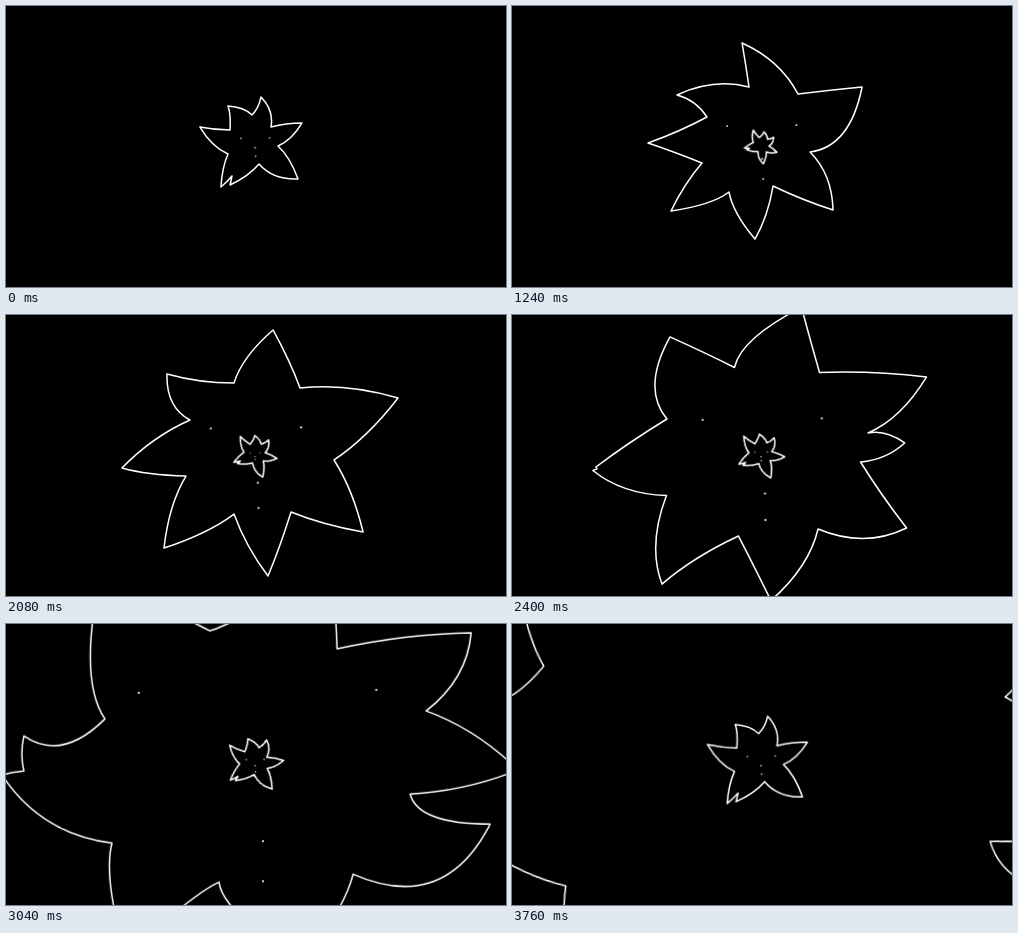
These frames come from a looping animation (500 by 281 pixels, 3800 ms). An HTML page without scripts:

```html
<!DOCTYPE html>
<html lang="en">
<head>
<meta charset="utf-8">
<title>Blooming flowers</title>
<style>
  html, body { margin: 0; width: 100%; height: 100%; overflow: hidden; background: #000; }
  svg { display: block; width: 100vw; height: 100vh; }
  path {
    fill: none; stroke: #fff; stroke-width: 1.5;
    stroke-linejoin: round; stroke-linecap: round;
    vector-effect: non-scaling-stroke;
    transform-origin: 249px 141px;
  }

  /* Both flowers share this pose: the bud ends in it, the bloom starts from it */
  .flower { d: path("M255 91Q268 104 265 121Q280 117 296 117Q286 134 272 140Q284 151 292 173Q267 174 253 158Q243 170 224 179Q225 175 226 170Q221 176 215 181Q216 162 222 148Q206 141 194 121Q209 124 224 124Q225 108 222 100Q238 101 246 109Q253 102 255 91Z"); }
  .bud { animation: bud 3800ms linear infinite; }
  .bloom { animation: bloom 3800ms linear infinite, leave 3800ms linear infinite; }

  .eyes { --spread: eyes; }
  .nose { --spread: nose; }
  .mouth { --spread: mouth; }
  g path { animation: var(--spread) 7600ms linear infinite, swell 7600ms linear infinite; }
  .older path { animation-delay: -3800ms; }

  @keyframes bud {
    0%, 7% { transform: rotate(70deg) scale(0); }
    18% { transform: rotate(60deg) scale(.16); }
    33% { transform: rotate(45deg) scale(.32); }
    55% { transform: rotate(33deg) scale(.42); }
    72% { transform: rotate(25deg) scale(.48); }
    80% { transform: rotate(18deg) scale(.55); }
    100% { transform: rotate(0deg) scale(1); }
  }

  /* Seven petals, then nine while leaving the stage */
  @keyframes bloom {
    17.89% { d: path("M243 63Q270 74 276 104Q297 104 317 101Q316 132 288 141Q294 158 314 172Q283 186 256 173Q234 192 235 213Q220 200 218 181Q203 184 183 184Q195 172 208 154Q190 133 166 132Q186 116 212 119Q208 94 187 92Q214 82 245 93Q247 79 243 63Z"); }
    32.63% { d: path("M230 37Q268 54 286 88Q319 84 350 81Q338 141 298 146Q320 168 321 204Q290 194 261 180Q256 210 243 233Q221 207 217 186Q200 199 159 205Q172 178 190 157Q160 145 136 137Q167 126 195 111Q184 94 165 89Q202 72 237 81Q234 60 230 37Z"); }
    54.74% { d: path("M267 15Q284 46 294 73Q341 68 392 83Q362 122 328 145Q347 175 357 217Q317 210 285 197Q274 232 262 261Q240 232 228 199Q203 218 158 233Q163 189 180 161Q141 160 116 153Q146 122 184 105Q160 92 161 59Q193 68 228 68Q236 42 267 15Z"); }
    54.75% { d: path("M267 15Q284 46 294 73Q341 68 392 83Q362 122 328 145Q328 145 328 145Q328 145 328 145Q347 175 357 217Q317 210 285 197Q274 232 262 261Q240 232 228 199Q203 218 158 233Q163 189 180 161Q141 160 116 153Q116 153 116 153Q116 153 116 153Q146 122 184 105Q160 92 161 59Q193 68 228 68Q236 42 267 15Z"); }
    71.58% { d: path("M312 -30Q314 10 321 42Q379 43 437 41Q416 86 384 91Q420 84 457 111Q421 144 369 149Q391 185 432 209Q388 257 327 231Q320 272 256 310Q243 268 225 243Q160 266 142 305Q108 272 129 200Q79 198 46 158Q50 156 54 155Q53 153 52 151Q84 135 126 103Q99 55 155 -15Q198 10 217 37Q222 5 312 -30Z"); }
    80%, 100% { d: path("M326 -50Q330 -10 331 25Q400 10 465 9Q461 55 420 87Q470 105 512 146Q460 167 404 170Q412 200 484 200Q438 290 347 250Q340 280 300 335Q217 290 213 258Q190 268 120 330Q97 255 106 219Q35 210 -4 151Q6 148 18 147Q14 130 18 112Q56 138 99 95Q72 55 95 -50Q170 -10 204 7Q225 0 326 -50Z"); }
  }
  @keyframes leave {
    0%, 80% { transform: none; }
    98.95%, 100% { transform: matrix(1.44, .14, .096, 1.765, 3.2, 3.4); }
  }

  /* Dots drift outwards over two loops */
  @keyframes eyes {
    0%, 27% { scale: .04; }
    40% { scale: .075; }
    50% { scale: .12; }
    59% { scale: .21; }
    66% { scale: .29; }
    77% { scale: .37; }
    86% { scale: .63; }
    90% { scale: 1; }
    100% { scale: 2.7; }
  }
  @keyframes nose {
    0%, 50% { scale: .01; }
    59% { scale: .11; }
    66% { scale: .15; }
    77% { scale: .34; }
    86% { scale: .64; }
    90% { scale: 1; }
    100% { scale: 2.4; }
  }
  @keyframes mouth {
    0%, 27% { scale: .03; }
    50% { scale: .08; }
    59% { scale: .18; }
    66% { scale: .27; }
    77% { scale: .44; }
    86% { scale: .66; }
    90% { scale: 1; }
    100% { scale: 2.4; }
  }
  @keyframes swell {
    0%, 25% { stroke-width: 1.2; opacity: 0; }
    28% { stroke-width: 1.2; opacity: 1; }
    50% { stroke-width: 1.5; }
    85%, 100% { stroke-width: 2.2; opacity: 1; }
  }
</style>
</head>
<body>
<svg viewBox="0 0 500 281">
  <path class="flower bloom"/>
  <path class="flower bud"/>
  <g class="older">
    <path class="eyes" d="M133 69h0M370 66h0"/>
    <path class="nose" d="M257 217h0"/>
    <path class="mouth" d="M257 257h0"/>
  </g>
  <g>
    <path class="eyes" d="M133 69h0M370 66h0"/>
    <path class="nose" d="M257 217h0"/>
    <path class="mouth" d="M257 257h0"/>
  </g>
</svg>
</body>
</html>
```
